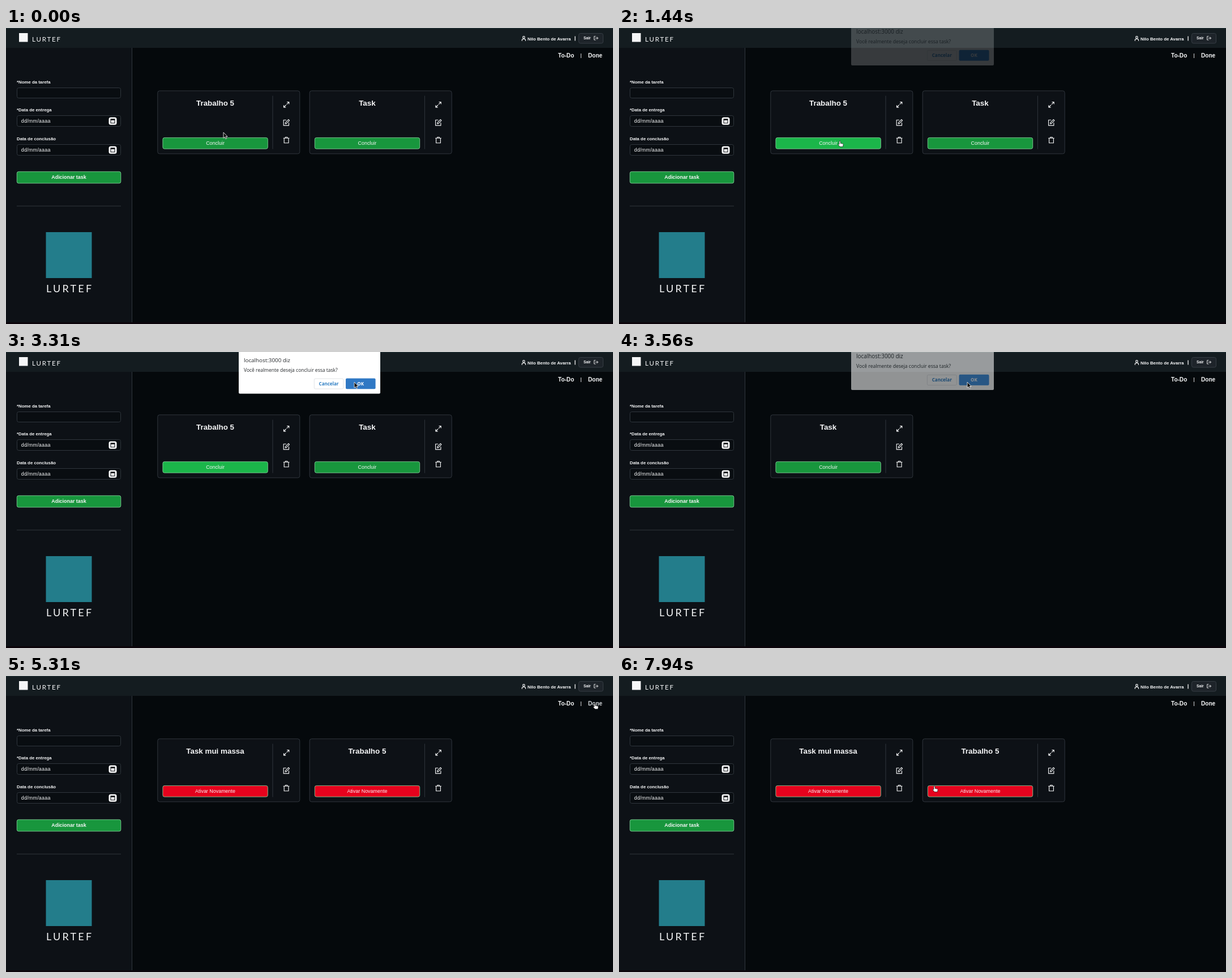
Animation, 1072 px wide and 522 px high, one loop 8 s. Source, as an HTML page:

```html
<!DOCTYPE html>
<html lang="pt-BR">
<head>
<meta charset="utf-8">
<title>Tarefas</title>
<style>
  html, body { margin: 0; width: 100%; height: 100%; overflow: hidden; background: #05090c; }
  svg { display: block; width: 1072px; height: 522px; }
  text { font-family: "Liberation Sans", Arial, sans-serif; font-size: 8.93px; fill: #f5f6f7; white-space: pre; }
  .b { font-weight: 700; }
  .s { font-size: 7.82px; }
  .m { text-anchor: middle; }
  .h { font-size: 13.4px; }
  .brand { font-family: Lato, sans-serif; }
  .line { stroke: #30363d; stroke-width: 1; fill: none; }
  .icon { fill: none; stroke: #f5f6f7; stroke-width: 1.15; stroke-linecap: round; stroke-linejoin: round; }
  .btn { stroke: #8fdca4; stroke-width: .8; }
  #dialog text { font-family: "Open Sans", "Noto Sans", sans-serif; fill: #25282b; }
</style>
</head>
<body>
<svg id="stage" viewBox="0 0 1072 522" xmlns="http://www.w3.org/2000/svg">
  <rect width="1072" height="522" fill="#05090c"/>
  <rect y="35" width="222" height="484" fill="#0d1116"/>
  <path class="line" d="M222.5 35V519"/>
  <rect width="1072" height="35" fill="#141c20"/>
  <rect width="1072" height="1" fill="#1d2f33"/>
  <rect y="519" width="1072" height="3" fill="#0b040a"/>

  <rect x="23" y="9" width="15.5" height="15.5" fill="#f5f6f7"/>
  <text class="brand" x="46" y="23.7" font-size="11.5" style="font-size:11.5px;letter-spacing:1.8px">LURTEF</text>

  <g class="icon" stroke-width="1">
    <circle cx="914.4" cy="16.4" r="1.8"/>
    <path d="M911.3 22.4v-1q0-2 2-2h2.200q2 0 2 2v1"/>
  </g>
  <text class="b s" x="921" y="21.700">Nilo Bento de Avarra</text>
  <rect x="1004.400" y="14.500" width="1.300" height="8" fill="#f5f6f7"/>
  <rect x="1011.500" y="9.500" width="43" height="17.500" rx="3" fill="#1e242a" stroke="#363d44"/>
  <text class="b" x="1020" y="20.300" style="font-size:6.7px">Sair</text>
  <path class="icon" style="stroke-width:.9" d="M1041 14.700h-2.300v6.300h2.300M1041 17.900h4.300M1043.600 16l1.900 1.900-1.900 1.900"/>

  <text class="b" x="975" y="52.300" style="font-size:10.05px">To-Do</text>
  <rect x="1015" y="45" width="1" height="8" fill="#d5d7d9"/>
  <text class="b" id="done" x="1028" y="52.300" style="font-size:10.05px">Done</text>

  <text class="b s" x="19" y="98.200">*Nome da tarefa</text>
  <text class="b s" x="19" y="147.400">*Data de entrega</text>
  <text class="b s" x="19" y="198.200">Data de conclusão</text>
  <g id="fields"></g>
  <rect class="btn" x="19.300" y="253.300" width="183.500" height="20.500" rx="3" fill="#18963d"/>
  <text class="b m" x="111" y="266.400">Adicionar task</text>
  <path class="line" d="M19 314H203"/>
  <rect x="70.500" y="360" width="81" height="81" fill="#237d8b"/>
  <text class="brand" x="71" y="465.500" style="font-size:18px;letter-spacing:3.2px">LURTEF</text>

  <g id="cards"></g>

  <g id="dialog">
    <path d="M411-20H661V71.500q0 2-2 2H413q-2 0-2-2Z" fill="#fff"/>
    <text x="420" y="17.700" style="font-size:9.84px">localhost:3000 diz</text>
    <text x="420" y="34.800" style="font-size:8.54px">Você realmente deseja concluir essa task?</text>
    <rect x="544.300" y="47" width="51.500" height="18" rx="2" fill="#fff" stroke="#dadce0" stroke-width=".8"/>
    <text class="m" x="570" y="58.900" style="font-size:8px;font-weight:700;fill:#2f7fc4">Cancelar</text>
    <rect id="ok" x="600" y="46.500" width="52.600" height="18.700" rx="2"/>
    <text class="m" x="626.200" y="58.900" style="font-size:8px;font-weight:700;fill:#fff">OK</text>
  </g>

  <path id="arrow" d="M0 0V10.300L2.300 8.200 3.900 11.600 5.600 10.800 4.100 7.500H7.200Z" fill="#101010" stroke="#e6e6e6" stroke-width=".9" stroke-linejoin="round"/>
  <path id="hand" d="M-1.100.900Q0-.7 1.100.900V4.300L5.200 5.100Q6.200 5.400 6.100 6.500L5.400 10.300H.2L-2.900 6.900Q-3.200 5.700-2 5.700L-1.100 6.300Z" fill="#fff" stroke="#161616" stroke-width=".7" stroke-linejoin="round"/>
</svg>
<script>
const LOOP = 8000;
const GREEN = [24, 150, 61], GREEN_HOT = [27, 182, 74];
const RED = [230, 2, 29], RED_HOT = [240, 12, 40];
const $ = id => document.getElementById(id);
const clamp = v => Math.max(0, Math.min(1, v));
const ramp = (t, a, b) => clamp((t - a) / (b - a));
const mix = (a, b, u) => `rgb(${a.map((v, i) => Math.round(v + (b[i] - v) * u))})`;

// Form fields
const box = (y, h) => `<rect class="line" x="19.500" y="${y}" width="183" height="${h}" rx="3" style="fill:#090d11"/>`;
const dateField = y => box(y, 19) + `
  <text x="26.700" y="${y + 12.900}" style="letter-spacing:.24px">dd/mm/aaaa</text>
  <rect x="181.500" y="${y + 3}" width="14" height="13.300" rx="3.500" fill="#fff"/>
  <path d="M184.500 ${y + 5.500}h8v8.300h-8zM185.600 ${y + 8.300}v4.400h5.800v-4.400z" fill="#0d1116" fill-rule="evenodd"/>`;
$("fields").innerHTML = box(105.5, 18) + dateField(154.5) + dateField(205.5);

// Task cards
const card = i => `<g id="card${i}" transform="translate(${i * 268.4} 0)">
  <rect class="line" x="267.800" y="110.800" width="251" height="111" rx="3.500" style="fill:#0d1116"/>
  <path class="line" d="M471 119.500V213.500"/>
  <text class="b m h" id="title${i}" x="369.500" y="137"></text>
  <rect class="btn" id="btn${i}" x="276.900" y="193.400" width="185.400" height="19.700" rx="3"/>
  <text class="m" id="label${i}" x="369.500" y="205.900"></text>
  <g class="icon">
    <path d="M496.500 130.500h3.300v3.300M499.600 130.700l-3.600 3.600M490.500 136.500v3.300h3.300M490.700 139.600l3.600-3.600"/>
    <path d="M494.500 162.200h-4.300v9.700h9.300v-4.500M493.200 168.900l.5-2.200 5.200-5.300 1.700 1.700-5.200 5.300z"/>
    <path d="M490.200 194.200h9.800M493.300 194v-1.500h3.600v1.500M491.200 194.400v8.300h7.800v-8.300"/>
  </g></g>`;
$("cards").innerHTML = card(0) + card(1);

// Pointer moves: start, end, steps, then points as [progress, x, y]
const moves = [
  [310, 1000, 12, [0, 384, 184], [0.5, 387, 190], [1, 390, 199]],
  [1750, 2130, 5, [0, 390, 199], [0.2, 384, 187], [0.6, 389, 139], [1, 503, 54]],
  [2310, 2310, 1, [0, 503, 54], [1, 512, 46]],
  [2630, 3000, 6, [0, 512, 46], [0.4, 555, 45], [1, 615, 53]],
  [3880, 4560, 8, [0, 615, 53], [0.5, 598, 111], [0.625, 650, 150], [0.8, 830, 125], [1, 1012, 64]],
  [4690, 5310, 10, [0, 1012, 64], [0.3, 1026, 55], [0.6, 1039, 48], [1, 1040, 48]],
  [5940, 6690, 11, [0, 1040, 48], [0.3, 870, 47], [0.636, 602, 57], [1, 407, 102]],
  [6880, 7630, 10, [0, 407, 103], [0.45, 345, 160], [0.7, 288, 190], [1, 449, 197]],
  [7690, 7940, 5, [0, 449, 197], [0.5, 500, 208], [1, 557, 194]]
];

function pointer(t) {
  let pos = [384, 184];
  for (const [from, to, steps, ...pts] of moves) {
    if (t < from) break;
    const u = Math.min(1, (Math.floor(ramp(t, from, to || 1) * (steps - 1)) + 1) / steps);
    const j = Math.max(1, pts.findIndex(p => p[0] >= u));
    const [a, b] = [pts[j - 1], pts[j]];
    const k = (u - a[0]) / (b[0] - a[0]);
    pos = [1, 2].map(i => a[i] + (b[i] - a[i]) * k);
  }
  return pos;
}

// Opacity and vertical shift of the dialog
function dialogState(t) {
  if (t < 1440) return [0, 0];
  if (t < 1500) return [0.2, -8];
  if (t < 1560) return [0.72, -3];
  if (t < 3560) return [1, 0];
  if (t < 3630) return [0.56, -7];
  return t < 3880 ? [0.05, -9] : [0, 0];
}

function setCard(i, title, label, fill) {
  $("card" + i).style.display = title ? "" : "none";
  $("title" + i).textContent = title;
  $("label" + i).textContent = label;
  $("btn" + i).style.fill = fill;
}

function draw(t) {
  const [x, y] = pointer(t);
  const finished = t >= 5200, removed = t >= 3500;
  if (finished) {
    const turn = ramp(t, 5200, 5300);
    const hot = [ramp(t, 7550, 7700) - ramp(t, 7700, 7850), ramp(t, 7930, 8080)];
    ["Task mui massa", "Trabalho 5"].forEach((name, i) => {
      const fill = turn < 1 ? mix(GREEN, RED, turn) : mix(RED, RED_HOT, hot[i]);
      setCard(i, name, "Ativar Novamente", fill);
    });
  } else {
    const hot = removed ? 0 : ramp(t, 740, 960);
    setCard(0, removed ? "Task" : "Trabalho 5", "Concluir", mix(GREEN, GREEN_HOT, hot));
    setCard(1, removed ? "" : "Task", "Concluir", mix(GREEN, GREEN, 0));
  }

  const [alpha, shift] = dialogState(t);
  const scale = shift ? 1.008 : 1;
  $("dialog").setAttribute("opacity", alpha);
  $("dialog").setAttribute("transform", `translate(${536 * (1 - scale)} ${shift}) scale(${scale})`);
  const pressed = t >= 3310 && t < 3440;
  $("ok").style.fill = pressed ? "#2f78c4" : t >= 2930 ? "#4392e2" : "#3789dd";

  const onDone = x >= 1028 && y < 56;
  $("done").style.fill = onDone ? "#cfd3d6" : "#f5f6f7";
  const onButton = y >= 193 && y <= 213 && (x > 277 && x < 462 || x > 545 && x < 731);
  const hand = onDone || onButton || t >= 1750 && t < 2060;
  for (const [id, on] of [["hand", hand], ["arrow", !hand]]) {
    $(id).style.display = on ? "" : "none";
    $(id).setAttribute("transform", `translate(${x} ${y})`);
  }
}

const start = performance.now();
function tick() {
  draw((performance.now() - start) % LOOP);
  requestAnimationFrame(tick);
}
tick();
</script>
</body>
</html>
```
